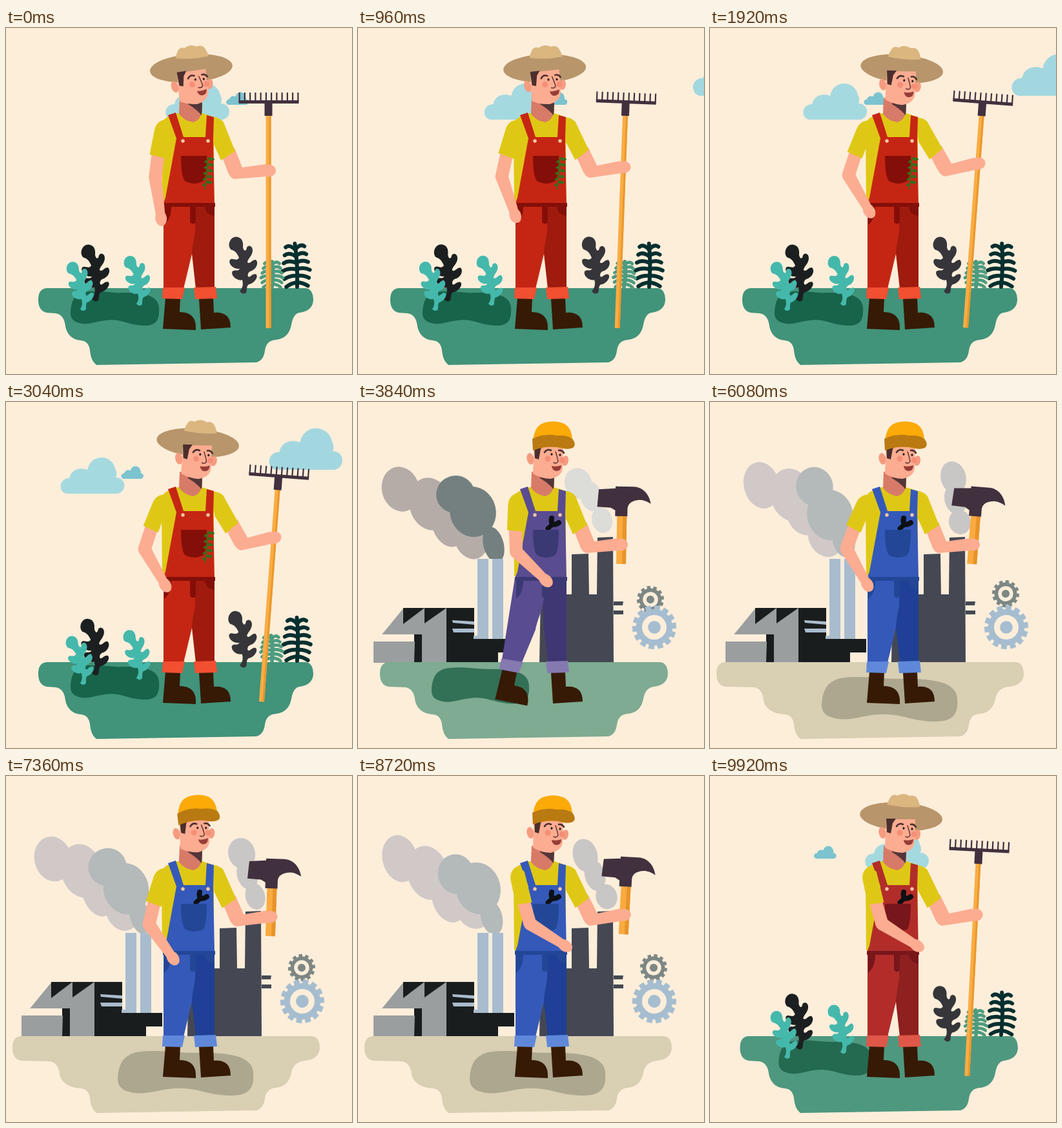
An HTML page with a canvas that plays this animation: 536 px wide and 536 px high, repeating every 10000 ms.

```html
<!DOCTYPE html>
<html lang="en">
<head>
<meta charset="utf-8">
<title>Farmer and mechanic</title>
<style>
html, body { margin: 0; overflow: hidden; background: #fdeeda; }
canvas { display: block; }
</style>
</head>
<body>
<canvas id="stage" width="536" height="536"></canvas>
<script>
const g = document.getElementById('stage').getContext('2d');
const BG = '#fdeeda', SKIN = '#fcac91', IRON = '#41303e', SHIRT = '#dfc815', BOOT = '#361a05';
let t = 0;

// ---- timing ----
const ease = u => u * u * (3 - 2 * u);
const ramp = (a, b) => Math.min(1, Math.max(0, (t - a) / (b - a)));
const soft = (a, b) => ease(ramp(a, b));
const shift = (a, b, c, d) => ramp(a, b) - ramp(c, d);
function key(times, values) {
  let i = 0;
  while (i < times.length - 2 && t >= times[i + 1]) i++;
  return values[i] + (values[i + 1] - values[i]) * soft(times[i], times[i + 1]);
}
const lerp = (a, b, u) => a + (b - a) * u;
function mix(a, b, u) {
  const part = (c, i) => parseInt(c.substr(1 + 2 * i, 2), 16);
  return `rgb(${[0, 1, 2].map(i => Math.round(lerp(part(a, i), part(b, i), u)))})`;
}

// ---- drawing ----
function fill(d, color) { g.fillStyle = color; g.fill(new Path2D(d)); }
function line(d, color, width) {
  g.strokeStyle = color; g.lineWidth = width; g.lineCap = g.lineJoin = 'round';
  g.stroke(new Path2D(d));
}
function oval(x, y, rx, ry, color, rot = 0) {
  g.fillStyle = color;
  g.beginPath(); g.ellipse(x, y, rx, ry, rot, 0, 7); g.fill();
}
function box(x, y, w, h, color) { g.fillStyle = color; g.fillRect(x, y, w, h); }
// Rotates (degrees) and scales around a pivot, keeping stage coordinates
function around(x, y, deg, sx, sy, draw) {
  if (sx <= 0 || sy <= 0) return;
  g.save();
  g.translate(x, y); g.rotate(deg * Math.PI / 180); g.scale(sx, sy); g.translate(-x, -y);
  draw();
  g.restore();
}
function local(x, y, deg, draw) {
  g.save();
  g.translate(x, y); g.rotate(deg * Math.PI / 180);
  draw();
  g.restore();
}

// ---- sky ----
function cloud(x, y, s, color) {
  if (s <= 0) return;
  g.save();
  g.translate(x, y); g.scale(s, s);
  fill('M10 0C-4-2-3-24 14-24C16-36 28-42 42-37C46-62 80-62 85-38C88-33 87-28 86-25C103-25 103-2 88 0Z', color);
  g.restore();
}
function clouds(nature) {
  const late = t > 5000, drift = -0.0535 * t, grow = Math.min(1, nature * 1.05);
  cloud(late ? 240 : 247 + drift, late ? 144 : 142, grow, '#a5d9e0');
  cloud(late ? 161 : 341 + drift, late ? 128 : 119, 0.35 * grow, '#7cc3d0');
  if (!late) cloud(570 + drift, 105, 1.15 * grow, '#a3d7df');
}

// ---- ground ----
function ground() {
  const p = shift(3470, 4390, 9400, 9970), L = 50 - 40 * p, R = 476 + 10 * p, F = 92 - 9 * p;
  fill(`M${L + 13} 403H${R - 12}Q${R} 404 ${R} 422Q${R - 1} 438 ${R - 21} 441Q445 442 442 460
    Q438 481 418 483Q403 484 401 500Q399 515 388 518L140 522Q131 515 130 499Q128 485 116 484
    Q${F + 4} 482 ${F} 462Q${F - 2} 444 ${F - 15} 442L${L + 13} 441Q${L} 438 ${L} 421Q${L} 404 ${L + 13} 403Z`,
    mix('#41937a', '#d9cfb3', p));
  const q = shift(3480, 5370, 9400, 9970);
  g.save();
  g.translate(lerp(100, 173, q), lerp(408, 426, q));
  g.scale(lerp(1.37, 2.1, q), lerp(0.53, 0.69, q));
  fill('M0 62C1 20 6 0 24 0C40-1 45 5 62 4C84 4 99 13 100 47C101 84 97 99 84 100C66 100 59 81 42 84C28 87 20 101 9 92C3 88 0 79 0 62Z',
    mix('#17644a', '#aca78e', q));
  g.restore();
}

// ---- plants ----
function leafy(x, y, s, color, sway, grow) {
  local(x, y, sway, () => {
    g.scale(s * grow, s * grow);
    fill(`M-6 0Q1-8-2-18C-10-16-20-24-18-31C-14-36-9-30-6-36C-14-34-24-42-22-49C-18-55-12-46-7-53
      C-11-62-14-64-20-66C-27-74-20-88-10-86C-2-85 0-77-1-70C0-64 4-62 5-69C8-75 16-71 14-62
      C12-54 7-52 6-46C10-42 13-50 19-50C25-46 20-34 11-32C6-30 6-24 8-23C12-23 14-29 20-27
      C24-22 16-12 8-11C4-8 6-2 4 2Q-1 6-6 0Z`, color);
  });
}
function fern(x, y, w, h, color, sway, grow) {
  local(x, y, sway, () => {
    g.scale(grow, grow);
    line(`M0 0Q3 ${-h / 2} 0 ${-h + 3}`, color, 6);
    for (let i = 0; i < 6; i++) {
      const b = -h * (.1 + .145 * i), reach = w * (1 - .09 * Math.abs(i - 2)), lift = (i - 1.5) * h * .03;
      for (const side of [-1, 1]) {
        line(`M0 ${b}Q${side * reach * .5} ${b - lift - 2} ${side * (reach - 3)} ${b - lift + 3}`, color, h * .04 + 3.2);
      }
    }
  });
}
function plants(n) {
  const sway = Math.sin(t / 610);
  fern(451, 401, 24, 70, '#062f30', -3 + 4 * Math.sin(t / 1250), n);
  fern(412, 401, 20, 42, '#4d9c80', 2 * sway, n);
  leafy(368, 408, 0.98, '#35353a', sway, n);
  leafy(139, 420, 0.98, '#1c1f20', sway, n);
  leafy(120, 435, 0.86, '#45b8ac', -6 + sway, n);
  leafy(207, 427, 0.87, '#45b8ac', -4 + sway, n);
}

// ---- factory ----
const POSES = [3840, 4560, 6080, 8720];
// Each puff: radii, then x and y at the four poses
const BACK = [
  [28, 36, [66, 66, 80, 65], [135, 136, 129, 128]],
  [32, 42, [112, 110, 126, 108], [158, 160, 144, 150]],
  [27, 40, [140, 138, 145, 142], [185, 184, 168, 188]],
  [28, 36, [175, 176, 180, 180], [207, 207, 205, 202]]];
const FRONT = [
  [29, 30, [151, 141, 162, 152], [143, 119, 131, 152]],
  [35, 40, [178, 182, 186, 186], [170, 167, 175, 174]],
  [16, 28, [210, 210, 207, 207], [221, 214, 214, 219]]];
const RIGHT = [
  [20, 25, [341, 377, 377, 352], [126, 118, 117, 123]],
  [16, 24, [361, 373, 380, 367], [146, 146, 151, 154]],
  [16, 20, [378, 391, 387, 385], [183, 182, 186, 187]]];
function smoke(puffs, color) {
  puffs.forEach(([rx, ry, xs, ys], i) => {
    const w = Math.sin(t / 500 + i);
    oval(key(POSES, xs), key(POSES, ys), rx + w, ry - w, color, -0.25);
  });
}
function gear(x, y, r, teeth, color, turn) {
  local(x, y, turn, () => {
    g.fillStyle = color;
    for (let i = 0; i < teeth; i++) {
      g.fillRect(-r * .13, -r, r * .26, r * .3);
      g.rotate(2 * Math.PI / teeth);
    }
    oval(0, 0, r * .83, r * .83, color);
    oval(0, 0, r * .56, r * .56, BG);
    oval(0, 0, r * .29, r * .29, color);
  });
}
function factory(n) {
  around(300, 403, 0, 1, n, () => {
    const light = ramp(3840, 4560);
    smoke(BACK, mix('#b5aca8', '#d0c9c8', light));
    smoke(FRONT, mix('#748080', '#b4b9b9', light));
    smoke(RIGHT, mix('#dcdcd8', '#c9c6c6', light));
    fill('M70 319H180V367H242V388H217V403H87V360H70Z', '#1a1d1e');
    fill('M37 360L70 330V344L103 319V343L137 319V404H99V360Z', '#9b9e9f');
    fill('M24 371H88L87 404H24Z', '#9b9e9f');
    fill('M38 359L70 320L70 348Z', '#9b9e9f');
    fill('M146 338L180 340V345L147 342ZM146 351H180V357H148Z', '#a9bccd');
    box(179, 362, 10, 5, '#a9bccd');
    box(185, 243, 40, 124, '#a9bccd');
    box(202, 243, 6, 124, '#f3ece0');
    fill('M331 236L357 235L358 298H370L371 210L395 209L396 403H281L283 298H331Z', '#454853');
    fill('M396 309H411L410 315H396ZM396 323H411V329H396Z', '#454853');
    const u = soft(3840, 4240);
    gear(lerp(453, 458, u), lerp(306, 297, u), 21, 12, '#7d8784', -t / 30);
    gear(459, 349, 34, 14, '#a6bdd0', t / 45);
  });
}

// ---- tools ----
function rake(s, slide) {
  g.translate(0, slide); g.scale(s, s);
  box(-4, -90, 8, 334, '#f9ad45');
  box(1, -90, 3, 334, '#eb982d');
  box(-6, -107, 12, 22, IRON);
  box(-46, -109, 93, 5, IRON);
  for (let i = 0; i < 12; i++) box(-46 + 8.25 * i, -121, 2.2, 14, IRON);
}
function hammer(s) {
  g.scale(s, s);
  box(-6, -46, 15, 76, '#f9ab40');
  box(3, -46, 6, 76, '#e8942a');
  fill('M-35-85L-9-87V-90H19C32-90 43-80 46-64C36-70 29-71 20-68Q11-65 10-57V-44H-9V-53L-16-57L-37-58Z', IRON);
}

// ---- person ----
function head() {
  const tilt = key([0, 700, 1900, 3300, 3840, 4560, 5300, 6080, 6700, 7300, 8100, 9920],
                   [-8, -7, 1, 1, 0, -15, -13, 0, 0, -4, 0, 0]);
  const hat = t < 5000 ? 1 - soft(3280, 3640) : soft(9430, 9750);
  const cap = t < 5000 ? soft(3480, 3800) : 1 - soft(9400, 9650);
  around(288, 128, tilt, 1, 1, () => {
    const lift = t < 5000 ? -45 * (1 - hat) : 0;
    const withHat = draw => {
      g.save();
      g.globalAlpha = hat; g.translate(0, lift);
      around(297, 64, 4, 1, 1, draw);
      g.restore();
    };
    withHat(() => oval(296, 63, 64, 22, '#b8956b'));
    oval(267, 88, 5.5, 9, '#f59c80', -.2);
    oval(321, 91, 5, 8, '#f59c80', .2);
    fill('M273 67H318L317 103Q315 116 298 119Q282 118 271 111Z', SKIN);
    fill('M273 66H288L283 73L280 89L274 87Z', '#4b2f2d');
    oval(294, 88, 4.5, 4.5, '#f58f78');
    oval(316, 90, 4.5, 4.5, '#f58f78');
    line('M289 78Q293 72 299 75M311 75Q316 74 319 79', '#4b2f2d', 2.6);
    oval(300, 81, 1.6, 1.9, '#33201f');
    oval(313, 82, 1.6, 1.9, '#33201f');
    line('M306 77Q309 86 310 92Q308 96 303 94', '#5c302d', 1.4);
    fill('M300 99Q307 101 315 98Q315 107 307 107Q301 106 300 99Z', '#963d37');
    withHat(() => fill('M273 46Q275 37 279 32Q283 29 288 31Q297 25 307 30Q316 27 320 35Q323 40 324 46Q298 50 273 46Z', '#dbb67f'));
    g.save();
    g.globalAlpha = cap; g.translate(0, -40 * (1 - cap) * (t < 5000));
    fill('M271 75Q269 40 286 33Q302 27 318 33Q330 38 332 57Q337 63 335 69Q330 74 319 72Q294 66 271 75Z', '#fbaa07');
    fill('M271 75L270 57Q288 48 308 52Q324 51 332 57Q337 63 335 69Q330 74 319 72Q294 66 271 75Z', '#b97a12');
    g.restore();
  });
}
function leg(shadeSide, main, cuff) {
  if (shadeSide) {
    fill('M284 274H323L323 404H294L288 350Z', main);
    fill('M299 419H321L322 441Q348 439 348 464L302 467Z', BOOT);
    fill('M291 402L325 401L327 419L293 420Z', cuff);
  } else {
    fill('M244 274H294L293 316Q288 340 288 350L275 404H244Z', main);
    fill('M247 418H270L269 440Q296 440 294 468L243 466Z', BOOT);
    fill('M243 402H277L273 420L242 419Z', cuff);
  }
}
function leftArm() {
  const times = [0, 1900, 3300, 3840, 4500, 7000, 8300, 9920];
  const upper = key(times, [-7, -18, -18, 2, -20, -20, 16, 16]);
  const fore = key(times, [8, 30, 30, 46, 30, 30, 58, 58]);
  local(242 + .15 * upper, 152, -upper, () => {
    fill('M-10 30H10L10 80H-10Z', SKIN);
    local(0, 80, upper - fore, () => {
      oval(0, 0, 10, 10, SKIN);
      fill('M-10 0H10L7 60H-7Z', SKIN);
      oval(0, 64, 9, 12, SKIN);
    });
    fill('M-10 6Q-8-8 6-11L14 0L12 49L-13 46Z', SHIRT);
  });
}
function person() {
  const c = shift(3300, 4020, 9400, 10000);
  const main = mix('#c52614', '#3559b9', c), dark = mix('#9f1b0d', '#1f4096', c);
  const pocket = mix('#840f08', '#234796', c), cuff = mix('#f25031', '#6088da', c);
  const step = key([3400, 3840, 4240, 4300], [0, 9, 0, 0]);

  const times = [0, 1920, 3300, 3840, 4560, 5300, 6080, 7300, 8720, 9920];
  const swing = key(times, [0, -7.5, -7.5, 0, -15.4, -14, 0, -2, -4, -4]);
  const tool = key(times, [0, 4.3, 4.3, 1, -8, -6, 4.5, 2, 3, 3]);
  const a = (41.2 + swing) * Math.PI / 180;
  const hx = 327 + 107.7 * Math.cos(a), hy = 150 + 107.7 * Math.sin(a);
  const rakeSize = t < 5000 ? 1 - soft(3250, 3600) : soft(9560, 9860);
  const hammerSize = t < 5000 ? soft(3520, 3800) : 1 - soft(9400, 9600);
  local(hx - 1.5, hy, tool, () => {
    if (rakeSize > 0) rake(rakeSize, 221 - hy);
    else if (hammerSize > 0) hammer(hammerSize);
  });

  leg(true, dark, cuff);
  around(262, 268, step, 1, 1, () => leg(false, main, cuff));

  fill('M266 132L304 132L322 138V270H242L241 165Q236 144 252 137Z', SHIRT);
  around(327, 150, swing, 1, 1, () => {
    fill('M332 192L354 186L366 216L402 211L404 230L354 234Q348 233 344 224Z', SKIN);
    oval(407, 221, 11, 9.5, SKIN);
    fill('M318 137Q332 139 337 146L355 191L333 205L320 176Z', SHIRT);
  });

  fill('M269 108L304 112V130Q300 144 290 146Q276 144 268 133Z', '#d87a68');
  fill('M282 116L304 116L303 135Q294 125 282 118Z', '#523638');

  fill('M251 135L263 131L275 169H309L311 135L322 138L321 172L323 273H243L247 263L264 171Z', main);
  box(243, 271, 81, 6, pocket);
  fill('M245 277H256Q256 296 245 305ZM323 277H308Q309 289 323 291Z', pocket);
  fill('M285 277H294V302Q287 305 285 300Z', pocket);
  if (t > 3560) {
    around(301, 188, 0, soft(3540, 3760), soft(3540, 3760), () => {
      line('M294 196L301 190', '#0d1014', 7);
      line('M300 180C298 190 304 192 311 187', '#0d1014', 8);
    });
  }
  fill('M271 198H311Q311 229 306 237Q292 245 277 237Q271 229 271 198Z', pocket);
  if (t < 3500) {
    g.globalAlpha = 1 - ramp(3300, 3500);
    line('M313 200Q311 225 309 249', '#3b6b1c', 1.8);
    for (let i = 0; i < 5; i++) {
      const y = 203 + i * 9, x = 313 - i * .8;
      oval(x + 5, y, 5, 2.3, '#3b6b1c', .1);
      oval(x - 3, y + 4, 3, 2, '#3b6b1c', -.4);
    }
    g.globalAlpha = 1;
  }
  oval(274, 175, 2.7, 2.7, '#fcc7a6');
  oval(313, 175, 2.7, 2.7, '#fcc7a6');

  leftArm();
  head();
}

function draw() {
  t = Math.floor(performance.now() % 10000 / 80) * 80;
  const nature = t < 5000 ? 1 - soft(3250, 3600) : soft(9480, 9960);
  const works = soft(3350, 3760) - soft(9400, 9740);
  box(0, 0, 536, 536, BG);
  clouds(nature);
  factory(works);
  ground();
  plants(nature);
  person();
  requestAnimationFrame(draw);
}
draw();
</script>
</body>
</html>
```
